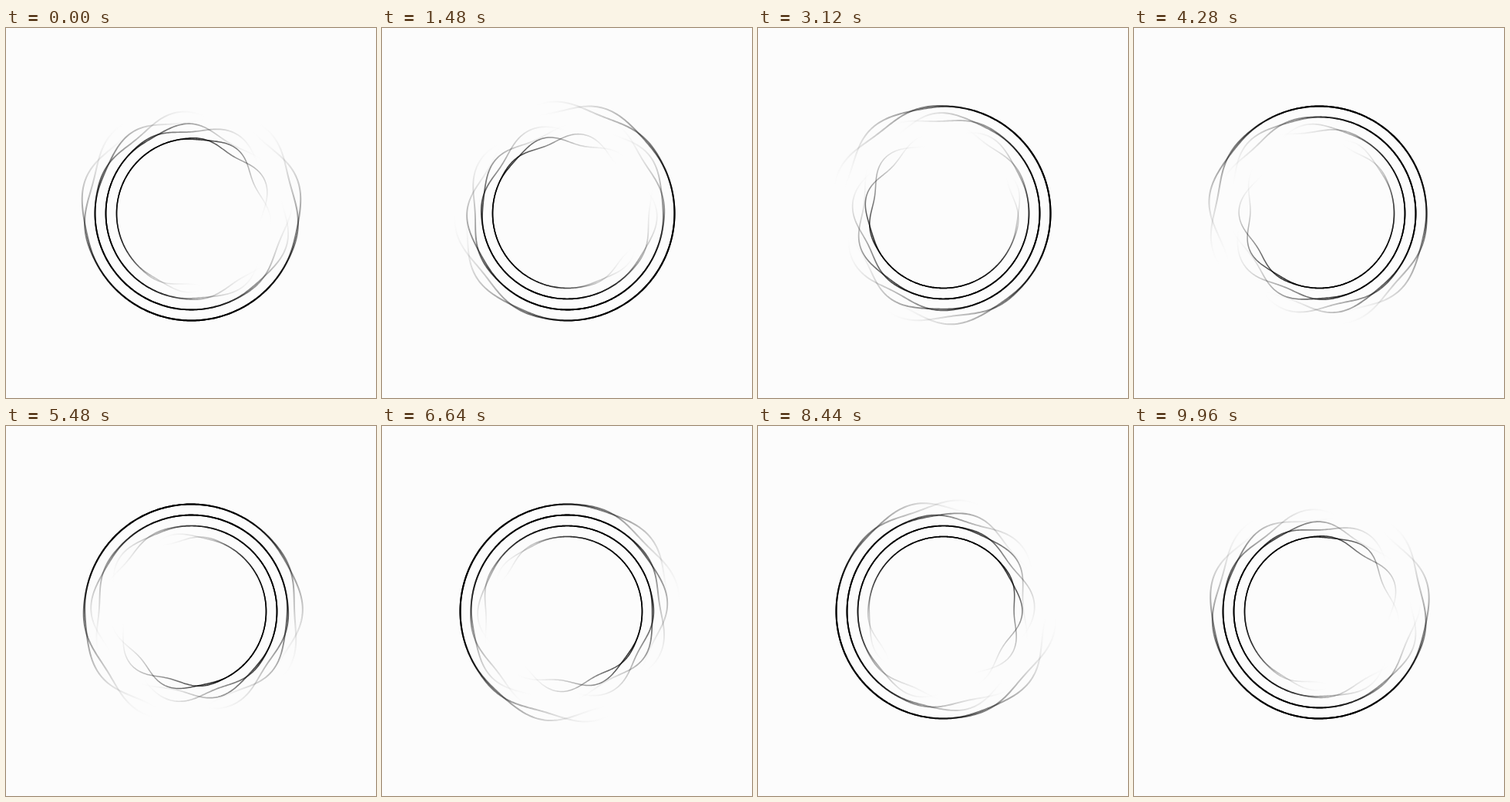
An HTML page with a canvas for the animation above (10 s loop, 480 by 480 pixels).

```html
<!DOCTYPE html>
<html lang="en">
<head>
<meta charset="utf-8">
<title>Rings</title>
<style>
  html, body { margin: 0; width: 100%; height: 100%; overflow: hidden; background: #fcfcfc; }
  canvas { display: block; width: 480px; height: 480px; }
</style>
</head>
<body>
<canvas id="stage" width="480" height="480"></canvas>
<script>
const ctx = document.getElementById('stage').getContext('2d');
const LOOP = 10000, CENTER = 240.5, SIZE = 480;
const RINGS = 4, OUTER = 139, GAP = 14;
const WAVE_STEP = 36, FADE_STEP = 45;     // lag of each inner ring, degrees
const AMP = 7.4, CROSSING = 85, LOBE = 35; // ripple height and node spacing
const REACH = 145;
const rad = deg => deg * Math.PI / 180;

function smooth(from, to, x) {
  const s = Math.min(1, Math.max(0, (x - from) / (to - from)));
  return s * s * (3 - 2 * s);
}

// Opaque in the middle of the arc, transparent at both ends.
function ink(angle) {
  const g = ctx.createConicGradient(rad(angle), CENTER, CENTER);
  const stops = 72;
  for (let i = 0; i <= stops; i++) {
    const a = 360 * i / stops;
    const alpha = smooth(REACH, 10, Math.min(a, 360 - a));
    g.addColorStop(i / stops, `rgba(0,0,0,${alpha.toFixed(4)})`);
  }
  return g;
}

// Ripple that grows away from the middle of the arc.
function ripple(u) {
  const d = Math.abs(u);
  return AMP * smooth(58, 128, d) * Math.sin(Math.PI * (d - CROSSING) / LOBE);
}

function strand(radius, waveMid, fadeMid, sign) {
  ctx.beginPath();
  for (let a = -REACH; a <= REACH; a++) {
    const u = fadeMid - waveMid + a;
    const r = radius + sign * ripple(u);
    const t = rad(fadeMid + a);
    ctx.lineTo(CENTER + r * Math.cos(t), CENTER + r * Math.sin(t));
  }
  ctx.stroke();
}

function draw(ms) {
  const turn = 90 - 360 * (ms % LOOP) / LOOP;
  ctx.fillStyle = '#fcfcfc';
  ctx.fillRect(0, 0, SIZE, SIZE);
  ctx.lineJoin = 'round';
  for (let i = 0; i < RINGS; i++) {
    const waveMid = turn + i * WAVE_STEP;
    const fadeMid = turn + i * FADE_STEP;
    ctx.strokeStyle = ink(fadeMid);
    ctx.lineWidth = 2 - i * 0.15;
    for (const sign of [1, -1]) strand(OUTER - i * GAP, waveMid, fadeMid, sign);
  }
}

const start = performance.now();
function tick() {
  draw(performance.now() - start);
  requestAnimationFrame(tick);
}
tick();
</script>
</body>
</html>
```
